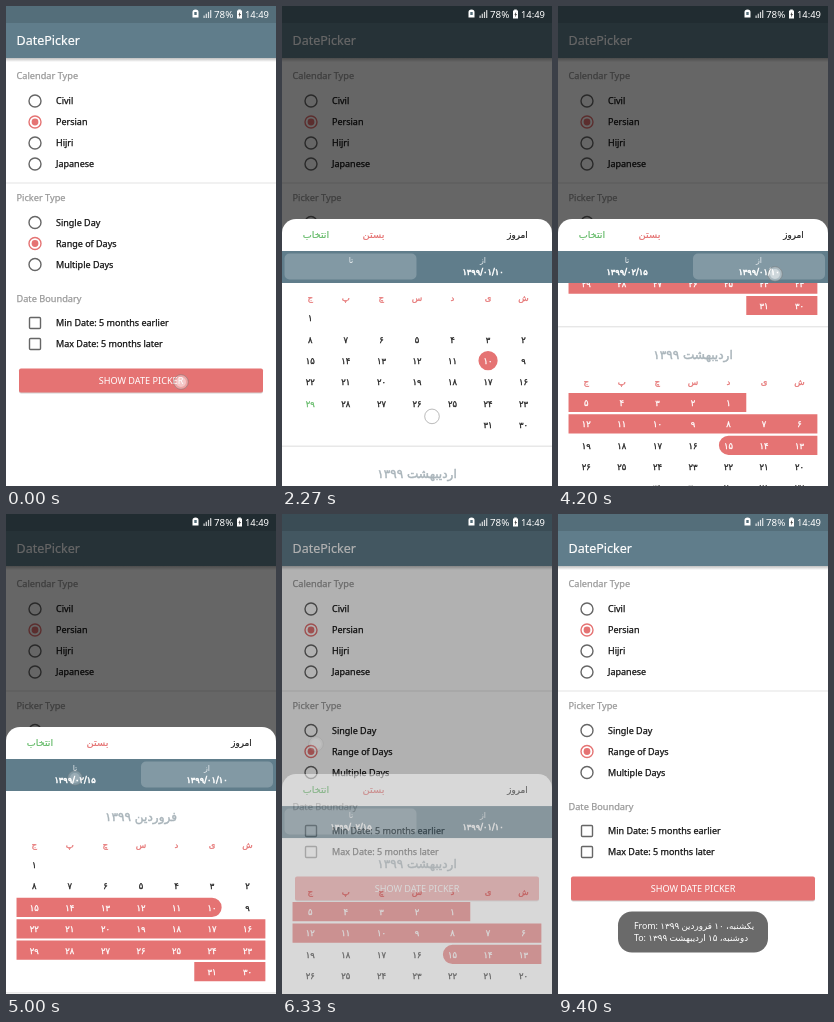
These frames come from a looping animation (270x480 px, 9.74 s). An HTML page:

```html
<!DOCTYPE html>
<html lang="en">
<head>
<meta charset="utf-8">
<title>Date picker</title>
<style>
  html, body { margin: 0; width: 100%; height: 100%; overflow: hidden; background: #fff; }
  svg { display: block; width: 270px; height: 480px; }
  text { font-family: "Noto Sans", "Open Sans", "DejaVu Sans", sans-serif; white-space: pre; }
  .fa { font-family: "DejaVu Sans", "Noto Sans", sans-serif; }
</style>
</head>
<body>
<svg id="stage" viewBox="0 0 270 480" xmlns="http://www.w3.org/2000/svg">
  <defs>
    <clipPath id="days"><rect y="277" width="270" height="300"/></clipPath>
    <linearGradient id="shade" x2="0" y2="1">
      <stop offset="0" stop-opacity=".25"/><stop offset="1" stop-opacity="0"/>
    </linearGradient>
  </defs>
</svg>
<script>
const LOOP = 9740, STEP = 1000 / 15;
const RED = '#e57373', GREEN = '#66bb6a', SLATE = '#607d8b';
const svg = document.getElementById('stage');

function el(parent, tag, attrs = {}) {
  const node = document.createElementNS('http://www.w3.org/2000/svg', tag);
  for (const k in attrs) node.setAttribute(k, attrs[k]);
  return parent.appendChild(node);
}
function rect(parent, x, y, width, height, fill, more) {
  return el(parent, 'rect', { x, y, width, height, fill, ...more });
}
function label(parent, x, y, str, size, fill, weight = 0, more) {
  const node = el(parent, 'text', { x, y, 'font-size': size, fill, ...more });
  if (weight) {
    node.setAttribute('stroke', fill);
    node.setAttribute('stroke-width', weight);
  }
  node.textContent = str;
  return node;
}
function persian(parent, x, y, str, size, fill, weight = 0) {
  return label(parent, x, y, str, size, fill, weight, { class: 'fa', 'text-anchor': 'middle' });
}
const digits = n => String(n).replace(/\d/g, d => String.fromCharCode(0x6f0 + +d));
const clamp = v => Math.max(0, Math.min(1, v));
const span = (t, a, b) => clamp((t - a) / (b - a));
const easeOut = p => 1 - (1 - p) ** 2;
const easeInOut = p => (1 - Math.cos(Math.PI * p)) / 2;

// Form screen
const form = el(svg, 'g');
rect(form, 0, 0, 270, 480, '#fff');
rect(form, 0, 52, 270, 4, 'url(#shade)');
rect(form, 0, 17, 270, 35, SLATE);
rect(form, 0, 0, 270, 17, '#546e7a');
label(form, 10.5, 39, 'DatePicker', 12.5, '#fff', .2);

function heading(y, str) { label(form, 10.5, y + 3.2, str, 9.2, '#999', .25); }
function option(y, str) { label(form, 50, y + 3.3, str, 9, '#111', .25); }
function radio(y, str, on) {
  const ring = { cx: 29, cy: y, r: 6, fill: 'none', stroke: on ? RED : '#666', 'stroke-width': 1.4 };
  el(form, 'circle', ring);
  if (on) el(form, 'circle', { cx: 29, cy: y, r: 3.4, fill: RED });
  option(y, str);
}
function checkbox(y, str) {
  rect(form, 23.5, y - 5.5, 11, 11, 'none', { rx: 1, stroke: '#666', 'stroke-width': 1.4 });
  option(y, str);
}
heading(70, 'Calendar Type');
['Civil', 'Persian', 'Hijri', 'Japanese'].forEach((s, i) => radio(95 + 21 * i, s, i === 1));
rect(form, 0, 176.5, 270, 1, '#e4e4e4');
heading(191.5, 'Picker Type');
['Single Day', 'Range of Days', 'Multiple Days'].forEach((s, i) => radio(216.5 + 21 * i, s, i === 1));
heading(292.5, 'Date Boundary');
checkbox(317, 'Min Date: 5 months earlier');
checkbox(338, 'Max Date: 5 months later');
rect(form, 13, 363.6, 244, 24, '#000', { rx: 2, opacity: .18 });
rect(form, 13, 362.6, 244, 24, RED, { rx: 2 });
label(form, 135, 378.1, 'SHOW DATE PICKER', 9.15, '#fff', 0, { 'text-anchor': 'middle' });

// Toast
const toast = el(svg, 'g');
rect(toast, 60, 397.5, 150, 41, '#6a6a6a', { rx: 14 });
label(toast, 76, 415, 'From: یکشنبه، ۱۰ فروردین ۱۳۹۹', 8.8, '#fff');
label(toast, 76, 427, 'To: دوشنبه، ۱۵ اردیبهشت ۱۳۹۹', 8.8, '#fff');

// Bottom sheet
const dim = rect(svg, 0, 0, 270, 480, '#000');
const sheet = el(svg, 'g');
rect(sheet, 0, 213, 270, 300, '#fff', { rx: 14 });
rect(sheet, 0, 270, 270, 320, '#fff');
persian(sheet, 34, 231.8, 'انتخاب', 9.6, GREEN, .2);
persian(sheet, 91.5, 231.8, 'بستن', 9.8, RED, .2);
persian(sheet, 235.5, 231.8, 'امروز', 8.8, '#222', .2);

const calendar = el(el(sheet, 'g', { 'clip-path': 'url(#days)' }), 'g');
const bars = el(calendar, 'path', { fill: RED });
const ROW = 21.4, COL = 35.55;
const colX = c => 241.6 - COL * c;
const months = [
  { name: 'فروردین', first: 6, top: 0, before: 0 },
  { name: 'اردیبهشت', first: 2, top: 204, before: 31 },
  { name: 'خرداد', first: 5, top: 387, before: 62 }
];
const cells = [];
for (const m of months) {
  persian(calendar, 135, m.top + 307, m.name + ' ۱۳۹۹', 12.1, '#a9b4ba', .45);
  [...'شیدسچپج'].forEach((s, c) => persian(calendar, colX(c), m.top + 333.5, s, 8.6, RED, .25));
  for (let d = 1; d <= 31; d++) {
    const slot = m.first + d - 1, c = slot % 7, row = Math.floor(slot / 7);
    const x = colX(c), y = m.top + 350.6 + ROW * row, day = m.before + d;
    const color = day === 29 ? GREEN : '#222';
    const node = persian(calendar, x, y + 3.3, digits(d), 8.4, color, .3);
    cells.push({ node, x, y, c, day, d, color });
  }
  const rows = Math.ceil((m.first + 31) / 7);
  rect(calendar, 0, m.top + 350 + ROW * rows, 270, 1, '#ddd');
}

rect(sheet, 0, 245, 270, 32, SLATE);
const tab = rect(sheet, 2.5, 247.5, 132, 26, '#fff', { rx: 5, opacity: .21 });
persian(sheet, 201, 256.7, 'از', 8, '#e8edef');
persian(sheet, 69, 256.7, 'تا', 8, '#e8edef');
const fromDate = persian(sheet, 201, 268.8, '۱۳۹۹/۰۱/۱۰', 8.3, '#fff', .55);
const toDate = persian(sheet, 69, 268.8, '۱۳۹۹/۰۲/۱۵', 8.3, '#fff', .55);

// Status icons
const status = el(svg, 'g', { fill: '#fff' });
el(status, 'path', { d: 'M186.5 6q0-2.5 3-2.5t3 2.5v5.5h-6z' });
rect(status, 188.3, 6, 2.4, 3, '#546e7a');
for (let i = 0; i < 4; i++) rect(status, 197.5 + 2.2 * i, 9.5 - 1.8 * i, 1.2, 2.5 + 1.8 * i, '#fff', { opacity: .8 });
label(status, 208, 11.8, '78%', 9.8, '#fff');
el(status, 'path', { d: 'M231 4.5h1.2v-1h2.6v1h1.2v8h-5z' });
el(status, 'path', { d: 'M234.2 5.8l-1.8 3h1.1l-.7 2.6 2.2-3.4h-1.2z', fill: '#333' });
label(status, 239, 11.8, '14:49', 9.4, '#fff');

// Touch marker: start, release, x, y, vertical travel
const touch = el(svg, 'g');
el(touch, 'circle', { r: 7.3, fill: '#fff', 'fill-opacity': .35, stroke: '#777', 'stroke-opacity': .5 });
el(touch, 'circle', { r: 5, fill: '#fff', 'fill-opacity': .4 });
const taps = [
  [-200, 70, 175, 376, 0],
  [1000, 1200, 206, 394, 0],
  [1667, 1800, 69, 262, 0],
  [2200, 2467, 150, 425, -100],
  [3333, 3533, 165.5, 400, 0],
  [4000, 4267, 217, 268, 0],
  [5000, 5133, 69, 264, 0],
  [6067, 6200, 34, 230, 0]
];

function drawTouch(t) {
  const tap = taps.find(([a, b]) => t > a - 10 && t < b + 190);
  touch.setAttribute('opacity', tap ? Math.min(.6 + span(t, tap[0], tap[0] + 70) * .4, 1 - span(t, tap[1], tap[1] + 190)) : 0);
  if (!tap) return;
  const [a, b, x, y, dy] = tap;
  touch.setAttribute('transform', `translate(${x} ${y + dy * easeInOut(span(t, a, b))})`);
}

// One bar per week row, rounded at either end of the range
function rowBar(head, tail, start, end, h) {
  const r = head.x + (head.day === start ? 0 : COL / 2);
  const l = tail.x - (tail.day === end ? 0 : COL / 2);
  const y = head.y;
  const right = head.day === start ? `A${h} ${h} 0 0 1 ${r} ${y + h}` : `V${y + h}`;
  const left = tail.day === end ? `A${h} ${h} 0 0 1 ${l} ${y - h}` : 'Z';
  return `M${l} ${y - h}H${r}${right}H${l}${left}Z`;
}

function drawSelection(t) {
  const ranged = t >= 3460;
  const start = 10, end = ranged ? 46 : 10;
  const grow = ranged ? .3 + .7 * easeOut(span(t, 3467, 3733)) : easeOut(span(t, 1133, 1467));
  const inside = cell => grow > 0 && cell.day >= start && cell.day <= end;
  let path = '', head = null;
  cells.forEach((cell, i) => {
    const on = inside(cell), next = cells[i + 1];
    cell.node.setAttribute('fill', on ? '#fff' : cell.color);
    cell.node.setAttribute('stroke', on ? '#fff' : cell.color);
    if (!on) return;
    head = head || cell;
    if (cell.c === 6 || cell.d === 31 || !inside(next)) {
      path += rowBar(head, cell, start, end, 9.6 * grow);
      head = null;
    }
  });
  bars.setAttribute('d', path);
  fromDate.setAttribute('opacity', t > 1190 ? 1 : 0);
  toDate.setAttribute('opacity', ranged ? 1 : 0);
}

function render(ms) {
  const t = Math.floor((ms % LOOP + 5) / STEP) * STEP;

  const leaving = t > 3000;
  const shown = leaving ? 1 - easeInOut(span(t, 6200, 6470)) : easeInOut(span(t, 400, 600));
  sheet.setAttribute('opacity', shown);
  sheet.setAttribute('transform', `translate(0 ${96 * (1 - shown)})`);
  dim.setAttribute('opacity', .6 * shown);

  const scroll = 204 * (easeOut(span(t, 2200, 2867))
    - easeOut(span(t, 4133, 4693))
    + easeOut(span(t, 5067, 5333)));
  calendar.setAttribute('transform', `translate(0 ${-scroll})`);

  const toTab = (t > 1790 && t < 4100) || t > 5060;
  tab.setAttribute('x', toTab ? 2.5 : 135);

  drawSelection(t);
  toast.setAttribute('opacity', span(t, 6400, 6790));
  drawTouch(t);
}

const begin = performance.now();
function tick() {
  render(performance.now() - begin);
  requestAnimationFrame(tick);
}
render(0);
requestAnimationFrame(tick);
</script>
</body>
</html>
```
